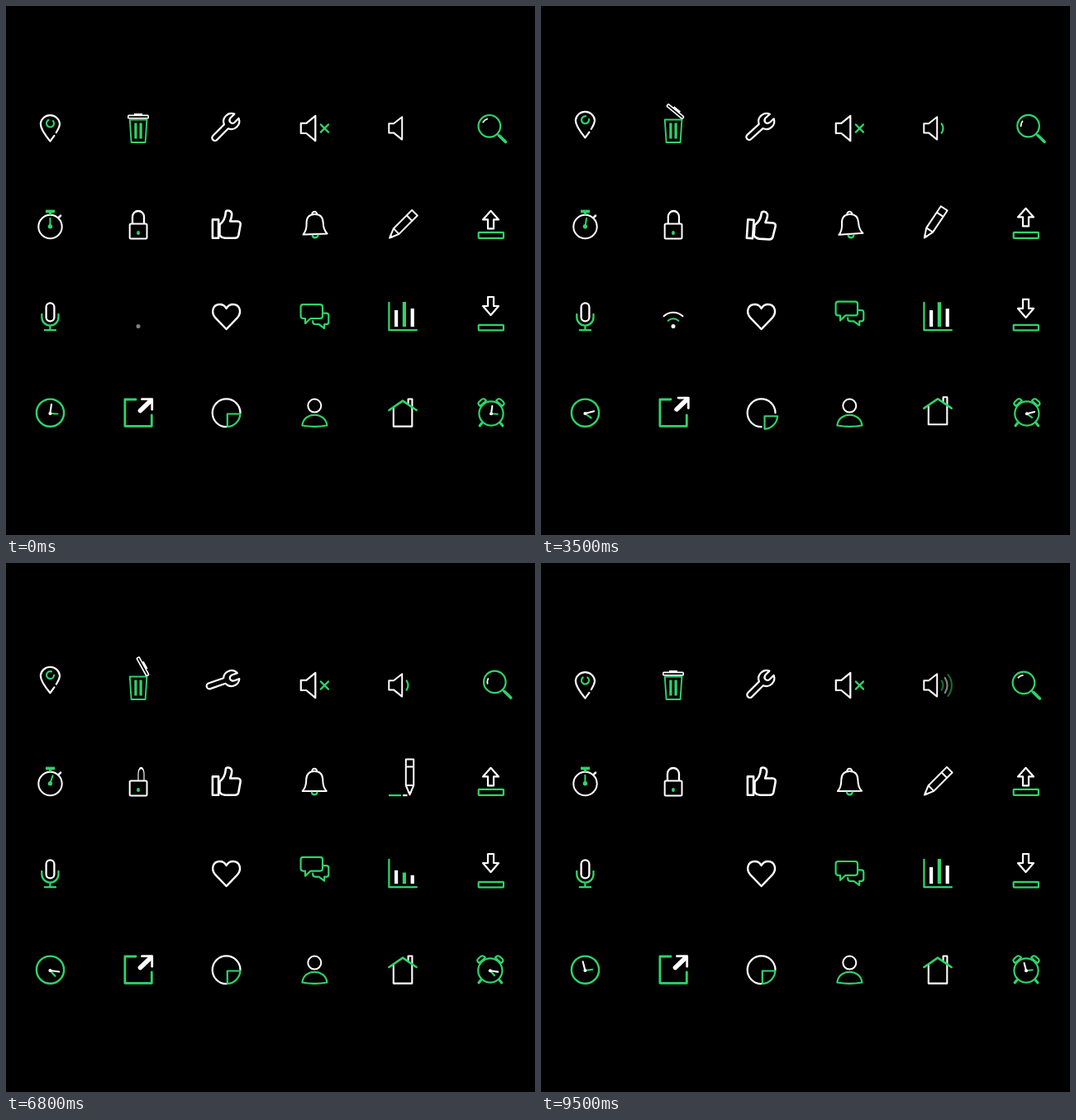
An HTML page with a canvas for the animation above (9600 ms loop, 640 by 640 pixels).

```html
<!DOCTYPE html>
<html lang="en">
<head>
<meta charset="utf-8">
<title>Icon set</title>
<style>
html, body { margin: 0; width: 100%; height: 100%; overflow: hidden; background: #000; }
canvas { display: block; }
</style>
</head>
<body>
<canvas id="stage" width="640" height="640"></canvas>
<script>
const ctx = document.getElementById('stage').getContext('2d');
const GREEN = '#2ed468', WHITE = '#fff';
const LOOP = 9600, STEP = 100, RAD = Math.PI / 180;

const clamp = x => Math.max(0, Math.min(1, x));
const ease = x => 0.5 - 0.5 * Math.cos(Math.PI * clamp(x));
const ramp = (t, from, to) => clamp((t - from) / (to - from));

// Eases from 0 to 1 between a and b, and back to 0 between c and d
const pulse = (t, a, b, c, d) => ease(ramp(t, a, b)) - ease(ramp(t, c, d));

function line(d, color = WHITE, width = 2.2) {
  ctx.strokeStyle = color;
  ctx.lineWidth = width;
  ctx.stroke(new Path2D(d));
}
function arc(x, y, r, from, to, color = WHITE, width = 2.2) {
  ctx.strokeStyle = color;
  ctx.lineWidth = width;
  ctx.beginPath();
  ctx.arc(x, y, r, from * RAD, to * RAD);
  ctx.stroke();
}
const ring = (x, y, r, color, width) => arc(x, y, r, 0, 360, color, width);
function dot(x, y, r, color = WHITE) {
  ctx.fillStyle = color;
  ctx.beginPath();
  ctx.arc(x, y, r, 0, 7);
  ctx.fill();
}
function bar(x, y, w, h, color = WHITE) {
  ctx.fillStyle = color;
  ctx.fillRect(x, y, w, h);
}
function box(x, y, w, h, r, color = WHITE, width = 2.2) {
  ctx.strokeStyle = color;
  ctx.lineWidth = width;
  ctx.beginPath();
  ctx.roundRect(x, y, w, h, r);
  ctx.stroke();
}
function at(x, y, draw, angle = 0, flip = 1) {
  ctx.save();
  ctx.translate(x, y);
  ctx.rotate(angle * RAD);
  ctx.scale(flip, 1);
  draw();
  ctx.restore();
}
function spin(x, y, angle, draw) {
  at(x, y, () => { ctx.translate(-x, -y); draw(); }, angle);
}
function fade(alpha, draw) {
  ctx.save();
  ctx.globalAlpha = clamp(alpha);
  draw();
  ctx.restore();
}

// Shared rise and fall of the arrows and the house
const lift = t => pulse(t, 0, 430, 550, 1550);

function pin(t) {
  const y = 4 * pulse(t, 900, 1150, 1200, 1500) - 8.5 * pulse(t, 0, 600, 750, 1100);
  at(0, y, () => {
    line('M60.8 153C63.3 149 65 146 65 142.3A11.7 11.7 0 0 0 41.8 142.3C41.8 148 47.5 156.5 53.4 163.6L58.4 156.8');
    const gap = t * 360 / 3200 - 79;
    arc(53.5, 142, 4.5, gap + 38, gap + 322, GREEN);
  });
}

function trash(t) {
  at(0, 1.5 * pulse(t, 2100, 2400, 2400, 2650), () => {
    line('M149.8 137.5L151.6 165H168.6L170.4 137.5Z', GREEN, 1.9);
    for (const x of [155.3, 161.5]) bar(x, 141.5, 3.2, 19, GREEN);
    spin(170.3, 134.3, 90 * pulse(t, 0, 650, 1550, 2500), () => {
      box(147.8, 132.4, 24.4, 3.4, 0.8, WHITE, 1.6);
      bar(155, 130, 10, 2);
    });
  });
}

function wrench(t) {
  const turn = pulse(t, 0, 350, 350, 1600) + pulse(t, 1700, 2250, 2450, 3700);
  at(272.6, 139.6, () => line(
    'M-8.8 -3.5H-28A3.5 3.5 0 0 0 -28 3.5H-8.8A9.7 9.7 0 0 0 9 3.7H2Q-1.7 3 -1.7 0Q-1.7 -3 2 -3.7H9A9.7 9.7 0 0 0 -8.8 -3.5Z'), 45 * turn - 45);
}

function mute(t) {
  at(pulse(t, 500, 700, 850, 1050), 0, () => {
    line('M356.8 141.8H363.3L374.3 132.8V163.2L363.3 154H356.8Z');
    line('M380.8 143.4L390 152.6M390 143.4L380.8 152.6', GREEN);
  });
}

function speaker(t) {
  line('M463.3 142.2H469L479.2 134.2V161.6L469 153.4H463.3Z', WHITE, 2);
  const out = 1 - ramp(t, 1380, 1620);
  for (let i = 0; i < 3; i++) {
    const start = 100 + 375 * i, spread = 33 + 2.5 * i;
    fade(ramp(t, start, start + 200) * out, () =>
      arc(476, 148, 10.3 + 5.3 * i, -spread, spread, i === 1 ? WHITE : GREEN));
  }
}

function magnifier(t) {
  const orbit = 131 - 360 * ease((t + 350) % 3200 / 2300);
  const x = 587 + 6 * Math.cos(orbit * RAD), y = 139.7 + 6 * Math.sin(orbit * RAD);
  at(x, y, () => {
    ring(0, 0, 13.3, GREEN);
    line('M9.5 9.7L11.5 11.7', GREEN, 2.4);
    line('M12 11.8L19.5 19.1', GREEN, 3.6);
    const glint = 232 - t * 360 / 3200;
    arc(0, 0, 9, glint - 20, glint + 20, WHITE, 1.8);
  });
}

function stopwatch(t) {
  ring(53.5, 267, 14.2, WHITE, 2);
  bar(48, 246.6, 11, 3.6, GREEN);
  bar(51.8, 250, 3.4, 2.6, GREEN);
  line('M64 255.6L66 253.6', WHITE, 2.6);
  at(53.4, 266.8, () => {
    line('M0 0V-10', GREEN, 2);
    dot(0, 0, 2.7, GREEN);
  }, 360 * ease((t - 50) / 2440));
}

function lock(t) {
  box(149.7, 263.5, 20.8, 18, 1.5, WHITE, 2);
  line('M160 273.7V275.3', GREEN, 3.6);
  at(167, 0, () => line('M0 262.5V255A7 7 0 0 0 -14 255V262.5', WHITE, 2.3),
    0, 1 - 2 * pulse(t, 250, 700, 1700, 2200));
}

function thumb(t) {
  const angle = 5 * pulse(t, 900, 1100, 1100, 1400) - 31 * pulse(t, 0, 750, 750, 1150);
  spin(251, 265, angle, () => {
    box(249.9, 258.4, 7.2, 22.4, 0, WHITE, 2.6);
    line('M258.5 264.5C263 261 265.5 256 265.8 249.5C266 246.8 271 246.8 272.8 250C274.2 253 272 257.5 271.2 260.5H280.5Q284.3 261 283.6 265L281.3 277.5Q280.5 280.7 277 280.7H265Q261 280.5 258.5 277.5Z', WHITE, 2.6);
  });
}

function bell(t) {
  const swing = pulse((t + 200) % 2400, 0, 800, 950, 1500);
  spin(373.2, 251, -13.3 * swing, () => {
    line('M358.7 275.9C362.5 272 363.2 268 363.2 262.5C363.3 255.5 367 252 373.2 252C379.4 252 383.2 255.5 383.3 262.5C383.3 268 384 272 387.8 275.9Z', WHITE, 2);
    line('M370.2 252A3 3.3 0 1 1 376.2 252', WHITE, 2);
    arc(373.2, 277, 3.3, 10, 170, GREEN, 2.4);
  });
}

function pencil(t) {
  const x = 463.5 + 25 * pulse(t, -50, 850, 2350, 3200);
  const end = Math.min(485.5, x - 0.5);
  bar(463, 280, Math.min(end, 478) - 463, 2.2, GREEN);
  bar(480, 280, Math.max(0, end - 480), 2.2);
  at(x, 281, () => line('M0 -0.7L-4.7 -12V-43.5H4.7V-12ZM-4.7 -34.5H4.7M-4.7 -12H4.7M-1.5 -3.5H1.5', WHITE, 2),
    45 - 45 * pulse(t, 1200, 1800, 3100, 3700));
}

function transfer(t) {
  const d = 7 * lift(t);
  at(0, -d, () => line('M586.5 247.8L596 258.4H590V269.4H583V258.4H577Z'));
  box(571.7, 273.9, 30.2, 7, 0.6, GREEN);
  at(0, d, () => line('M586.5 374L596 363H590V352H583V363H577Z'));
  box(571.7, 385.8, 30.2, 6.6, 0.6, GREEN);
}

function mic(t) {
  const squash = 4 * pulse(t, 150, 1000, 1100, 1900);
  at(6 * pulse(t, 2500, 2800, 2800, 3200), 0, () => {
    box(48.6, 359.3 + squash, 9.8, 22 - 2 * squash, 4.9, WHITE, 2.3);
    line('M43.3 373V376.5A10.1 10.1 0 0 0 63.5 376.5V373M53.4 386.6V392M46.8 392.2H60', GREEN, 2.3);
  });
}

function wifi(t) {
  const out = 1 - ramp(t, 1500, 1900);
  for (let i = 0; i < 3; i++) {
    const start = 400 * i - 150;
    fade(out * ramp(t, start, start + 300), () => i
      ? arc(160, 387.5, 1.6 + 7.6 * i, -133, -47, i === 1 ? GREEN : WHITE, 2)
      : dot(160, 387.4, 2.5));
  }
}

function heart() {
  line('M266.6 391L253 376.8C247.5 370 250.5 361 258.5 361C262.5 361 265.2 363.2 266.6 366C268 363.2 270.7 361 274.7 361C282.7 361 285.7 370 280.2 376.8Z', WHITE, 2.4);
}

function chat(hop, t) {
  at(0, -7.2 * pulse(hop, 0, 600, 700, 1600), () => {
    line('M359.5 361.2H380Q383 361.2 383 364.2V375Q383 378 380 378H368.5L362 384V378H359.5Q356.6 378 356.6 375V364.2Q356.6 361.2 359.5 361.2Z', GREEN);
    line('M384 371.6H387.5Q390.3 371.6 390.3 374.4V382.2Q390.3 385 387.5 385H385.2V390L378.5 385H374Q371.2 385 371.2 382V381', GREEN);
    for (let i = 0; i < 3; i++) {
      const first = 400 + 250 * i, second = 2120 + 330 * i;
      const alpha = pulse(t, first, first + 200, 1400, 1600) + pulse(t, second, second + 200, 3200, 3500);
      fade(alpha, () => dot(362.6 + 7.1 * i, 369.4, 1.9, i === 1 ? GREEN : WHITE));
    }
  });
}

function chart(t) {
  const mixed = pulse(t, 0, 700, 1200, 2200), low = pulse(t, 1200, 2200, 2400, 3600);
  const column = (x, h, color) => bar(x, 388 - h, 4.2, h, color);
  line('M463.4 359V392.2H496.8', GREEN, 2.3);
  column(470, 20 + 8 * mixed - 5 * low);
  column(479.8, 30 - 12 * mixed - 17 * low, GREEN);
  column(489.6, 22 - 9 * mixed - 12 * low);
}

function hands(x, y, t, scale) {
  at(x, y, () => line(`M0 0V${-9 * scale}`, GREEN, 2.1), 93 + t * 360 / 3200);
  at(x, y, () => line(`M0 0V${-11 * scale}`, WHITE, 2.1), 8 + t * 360 / 1600);
  dot(x, y, 2);
}

function clock(t) {
  ring(53.5, 492.2, 16.6, GREEN, 2.4);
  hands(53.4, 493, t, 1);
}

function alarm(t, wave) {
  const shake = wave > 200 && wave < 1450 ? 1.2 * Math.cos(3 * Math.PI * (wave - 800) / 400) : 0;
  at(587 + shake, 0, () => {
    ring(0, 493, 14.6, GREEN);
    for (const side of [-1, 1]) {
      at(0, 0, () => {
        line('M6 477.3L8.2 475.5Q10 474.8 11.5 476L15 479.2Q16.2 480.8 15 482.5L13.4 484Z', GREEN, 2.2);
        line('M11.4 504.7L13.8 507.7', GREEN, 3.2);
      }, 0, side);
    }
    hands(0, 493.3, t, 0.86);
  });
}

function link(t) {
  line('M157 476H143.9V508.3H176.3V495', GREEN, 2.8);
  const d = 3.8 * lift(t);
  at(d, -d, () => {
    line('M162.5 489.5L174.5 478', WHITE, 5.6);
    line('M164.5 475.7H176.7V488.2', WHITE, 2.8);
  });
}

function pie(t) {
  const out = 3.5 * pulse(t, 2020, 2300, 3300, 3950);
  spin(266.6, 492.3, 360 * ease(t / 1530), () => {
    arc(266.6, 492.3, 16.9, 90, 360);
    at(out, out, () => line('M267.8 493.5H283.4A16.5 16.5 0 0 1 267.8 509Z', GREEN));
  });
}

function person(t) {
  line('M358.4 507.5C360 490.5 386.5 490.5 388.4 507.5Q373.4 510.4 358.4 507.5Z', GREEN);
  ring(373.3, 483.6 + 2 * pulse(t, 850, 1080, 1100, 1350), 8, WHITE, 2);
}

function house(t) {
  at(0, -5.5 * lift(t), () => {
    line('M468.8 486V508.6H491.3V486M486.6 481V475.5H491.4V485', WHITE, 2.1);
    line('M463.4 489L480 477.6L496.6 489', GREEN, 2.6);
  });
}

function draw(time) {
  const short = time % 1600, mid = time % 2400, wide = time % 3200, long = time % 4800;
  ctx.fillStyle = '#000';
  ctx.fillRect(0, 0, 640, 640);
  ctx.lineCap = ctx.lineJoin = 'round';
  pin(wide);
  trash(wide);
  wrench(long);
  mute(short);
  speaker(short);
  magnifier(wide);
  stopwatch(wide);
  lock(wide);
  thumb(mid);
  bell(mid);
  pencil(long);
  transfer(mid);
  mic(long);
  wifi(mid);
  heart();
  chat(short, long);
  chart(long);
  clock(time);
  link(mid);
  pie(long);
  person(short);
  house(mid);
  alarm(time, wide);
}

const began = performance.now();
function tick() {
  const time = (performance.now() - began) % LOOP;
  draw(Math.floor(time / STEP) * STEP);
  requestAnimationFrame(tick);
}
tick();
</script>
</body>
</html>
```
